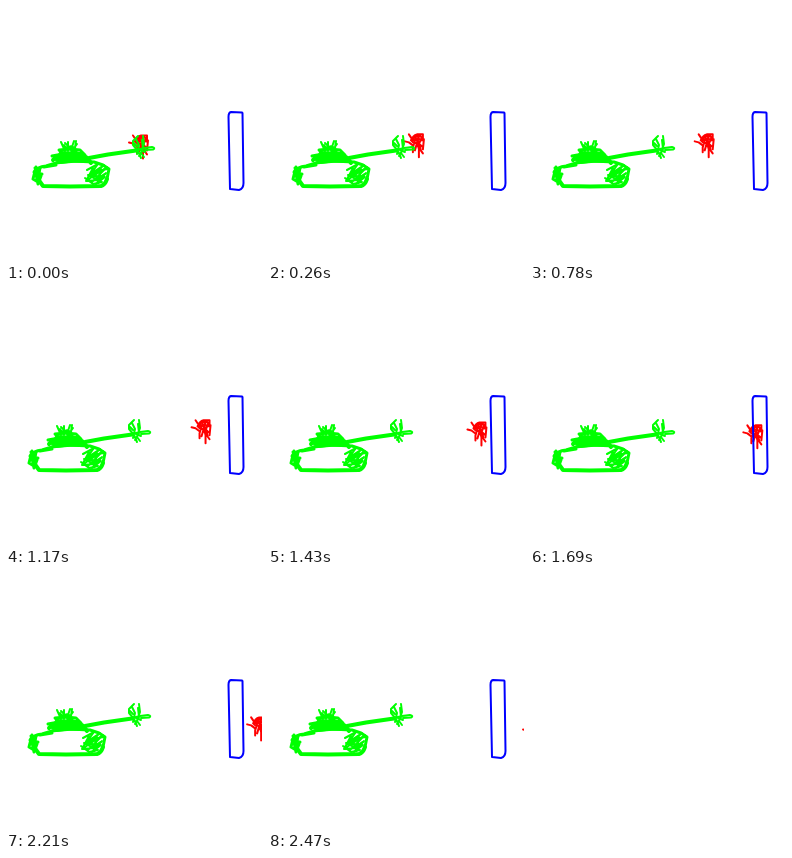
An HTML page that plays this animation: 256x256 px, repeating every 2600 ms.

```html
<!DOCTYPE html>
<html lang="en">
<head>
<meta charset="utf-8">
<title>Tank shot</title>
<style>
html, body { margin: 0; width: 100%; height: 100%; overflow: hidden; background: #fff; }
svg { display: block; width: 100vw; height: 100vh; }
path { fill: none; stroke-linecap: round; stroke-linejoin: round; }
#shell { stroke: #f00; stroke-width: 2; }
#tank { stroke: #0f0; stroke-width: 2; }
#tank .thick { stroke-width: 4; }
#tank .mid { stroke-width: 3; }
#wall { stroke: #00f; stroke-width: 2; }
</style>
</head>
<body>
<svg viewBox="0 0 256 256">
  <g id="shell">
    <path d="M0 9 L4 10 L8 13 M4 2 L8 8 M6 8 Q8 3 12 2 L18 2 L18 8 L16 4 L10 4 L7 9 L13 6 L17 8"/>
    <path d="M11 5 L8 15 L8 20 M14 4 L10 18 M12 8 L14 17 L14 25 M17 5 L13 14 L18 21 M19 7 L18 17 M8 10 L14 11 L17 14 M14 9 L16 18"/>
  </g>
  <g id="tank">
    <path class="thick" d="M28 173 L33 180 L60 180.5 L91 180 Q95 179 97 173"/>
    <path class="mid" d="M24 166 Q27 161 36 160 L46 157 L62 155 L84 156 L93 159 L99 163 L97 173"/>
    <path class="mid" d="M26 161 L23 173 L28 176 M25 162 L31 170 L28 178 L26 168 L32 168 M30 162 L28 173 M34 161 L46 159"/>
    <path d="M77 164 L88 158 L80 169 L94 159 L79 173 L97 161 L82 176 L96 167 L86 178 L95 171 L78 169 L88 174 L76 175 L83 162 L89 177 L91 161 L85 165 L98 163 M75 172 L83 178 L92 176"/>
    <path class="thick" d="M43 154 L47 150 L76 151 L79 155 L47 154 L51 147 L71 148 L75 152 L56 151 L63 146 L69 148 M78 153 L81 157 M50 156 L72 154"/>
    <path class="mid" d="M42 150 L53 148 L49 144 L60 143 L70 144 L75 149"/>
    <path d="M55 145 L51 136 M58 145 L54 139 M58 145 L58 136 M61 144 L64 135 M62 145 L67 138 M65 142 L66 135 M54 142 L62 140 L66 144 M55 137 L61 143"/>
    <path class="thick" d="M79 152 L98 148.5 L126 144.5"/>
    <path d="M126 144 L134 142 L142 141 Q146 142 143 143.5 L135 144"/>
    <path d="M128 130 L123 135 L123 139 L128 145 L131 152 M126 133 L129 139 L127 148 M133 130 L134 138 L131 147 L134 151 M132 134 L133 143 L129 150 M124 137 L127 140 M135 146 L130 144"/>
  </g>
  <path id="wall" d="M236 106.5 L225 106 Q222.5 106.5 222.5 111 L224 183 L233 184 Q237.5 183 237.5 177 L236.5 107"/>
</svg>
<script>
const STEP = 130, STEPS = 20, RECOIL = 4;
const shell = document.getElementById("shell");
const tank = document.getElementById("tank");
const start = performance.now();

const place = (el, x, y) => el.setAttribute("transform", `translate(${x} ${y})`);

function draw() {
  const i = Math.floor((performance.now() - start) / STEP) % STEPS;
  // The shell flies a parabola that peaks at the fourth step.
  place(shell, 123 + 6.95 * i, 126 + 0.091 * (i - 4) ** 2);
  place(tank, RECOIL - Math.min(i, RECOIL), 0);
  requestAnimationFrame(draw);
}
draw();
</script>
</body>
</html>
```
